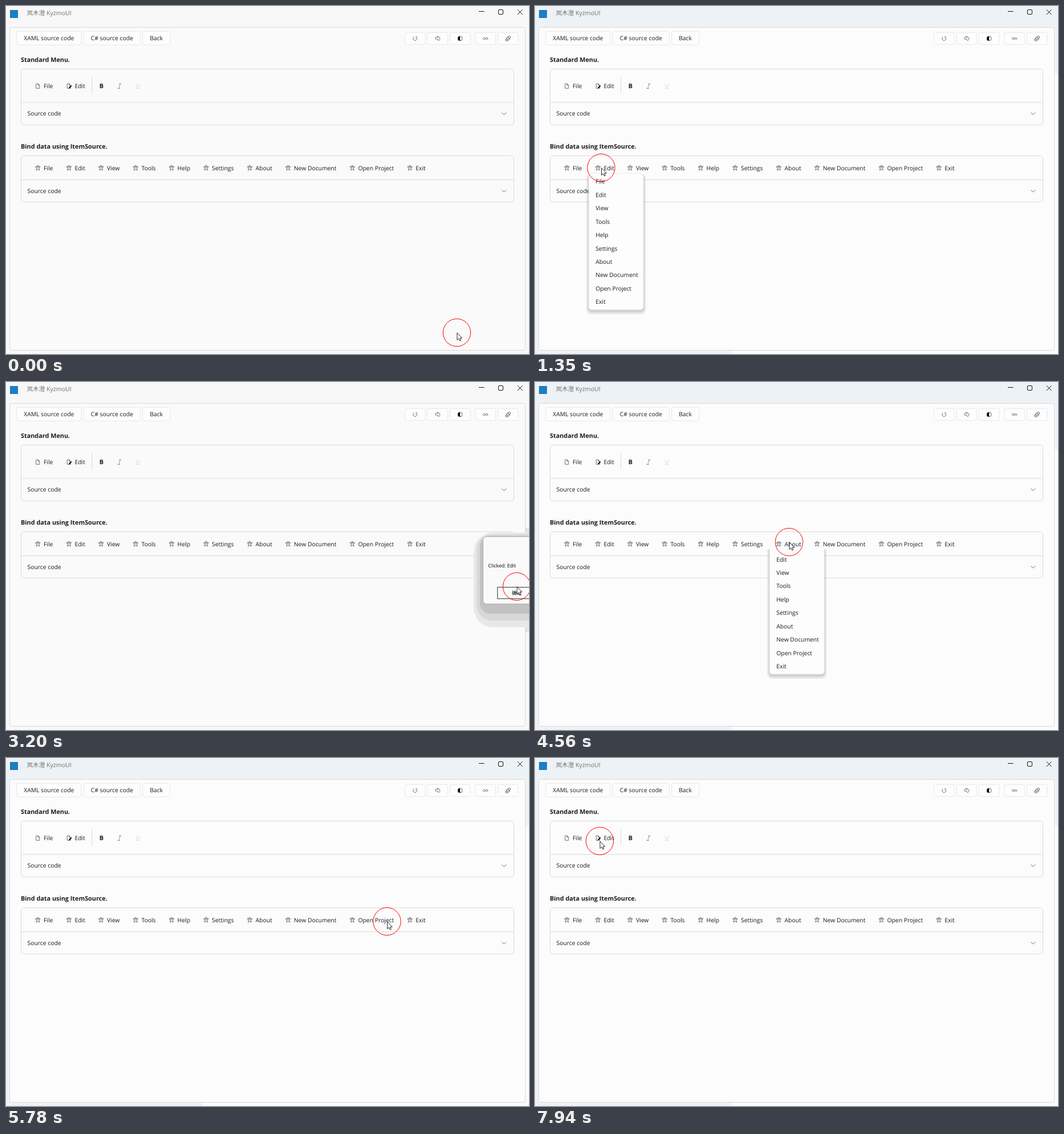
Write an HTML page that moves like this. It is 917x610 px and loops after 7990 ms.

```html
<!DOCTYPE html>
<html lang="en">
<head>
<meta charset="utf-8">
<style>
  html, body { margin: 0; width: 100%; height: 100%; overflow: hidden; background: #f8f8f8; }
  svg { display: block; width: 917px; height: 610px; }
  text { font: 10.35px "Open Sans", "Noto Sans CJK SC", "Noto Sans CJK", sans-serif; fill: #1c1c1c; text-rendering: geometricPrecision; }
  .head { font-size: 10.85px; font-weight: 700; }
  .title { font-size: 10.6px; fill: #707070; }
  .small { font-size: 8.7px; fill: #000; }
  .icon { fill: none; stroke: #484848; stroke-width: .8; }
  .edge { fill: none; stroke: #dadada; }
  .button { fill: #fdfdfd; stroke: #e8e8e8; }
</style>
</head>
<body>
<svg id="stage" viewBox="0 0 917 610"></svg>
<script>
const LOOP = 7990;
const SLIDE_TIME = 550, SLIDE = 90;
const MOVE_TIME = 400;

const LABELS = ["File", "Edit", "View", "Tools", "Help", "Settings", "About", "New Document", "Open Project", "Exit"];

// open time, close time, label
const MENUS = [[910, 2060, "Edit"], [4349, 4930, "About"], [5190, 5760, "New Document"], [6840, 7400, "Open Project"]];
const DIALOGS = [[2300, 3420], [7400, 7660]];

// arrival time, x, y of the pointer
const STOPS = [
  [50, 790.5, 572.5], [260, 270.5, 281], [880, 116, 283.5], [2060, 122, 331], [2520, 147, 152],
  [3190, 895.5, 358.5], [4000, 375, 273.5], [4550, 445.5, 280.5], [5110, 547.5, 289.5], [5780, 668, 286.5],
  [5950, 709.5, 290], [6290, 626.5, 392], [6790, 626.5, 392], [6900, 618, 285], [7560, 893, 390], [7930, 113.5, 145.5]
];

const text = (x, y, s, cls = "") => `<text x="${x}" y="${y}" class="${cls}">${s}</text>`;
const box = (x, y, w, h, r, attrs) => `<rect x="${x}" y="${y}" width="${w}" height="${h}" rx="${r}" ${attrs}/>`;
const icon = (x, y, d, attrs = "") => `<path class="icon" transform="translate(${x} ${y})" d="${d}" ${attrs}/>`;
const ring = (x, y, r) => `<circle class="icon" cx="${x}" cy="${y}" r="${r}"/>`;

const pen = document.createElement("canvas").getContext("2d");
pen.font = '10.35px "Open Sans", sans-serif';
const widthOf = s => pen.measureText(s).width;

// Sets labels side by side; returns the left edge of each.
function flow(labels, x, gap) {
  return labels.map(s => {
    const left = x;
    x += widthOf(s) + gap;
    return left;
  });
}

const labelX = flow(LABELS, 66, 38.1);
const PAGE = "M-3-4H.6L3-1.5V4H-3ZM.6-4V-1.5H3";

const person = (x, y) => ring(x, y - 3.2, 1.3) +
  icon(x, y, "M-4-2.5Q0-.5 4-2.5Q5-1.4 1.8-.3L3 4Q2 5 0 1.6Q-2 5-3 4L-1.8-.3Q-5-1.4-4-2.5");

function titleBar() {
  return box(7, 7, 14, 14, 0, 'fill="#1b7fc4"') +
    text(36.5, 16.3, "岚木澄 KyzmoUI", "title") +
    '<g fill="none" stroke="#111"><path d="M829 9.5H838.5M897 6.5L905.5 15M905.5 6.5L897 15"/>' +
    box(863.5, 6.5, 8, 8, 1.5, "") + "</g>";
}

function toolbar() {
  const labels = ["XAML source code", "C# source code", "Back"];
  const glyphs = [
    "M2.2-2.6A3.4 3.4 0 1 1-1.8-2.9M2.4-4V-2.4H.8",
    "M-4-.5C-3-5 4-4.5 4 .5C4 4 0 4 .5 2.2C.5 0-1.8 1.6-3.4.9ZM-1-2H1.5",
    "M0-4A4 4 0 0 1 0 4A4 4 0 0 1 0-4",
    "M0 0C-1.6-2.4-4-2.2-4 0S-1.6 2.4 0 0S4-2.2 4 0S1.6 2.4 0 0",
    "M.5-4H4V-.5H.5ZM-4 1H-1V4H-4ZM-2.5 1V-2H.5M2.2-.5V2.5H-1"
  ];
  const left = flow(labels, 31.2, 29.3).map((x, i) =>
    box(x - 12.5, 44.5, widthOf(labels[i]) + 25, 23.5, 3, 'class="button"') + text(x, 59.8, labels[i]));
  const right = glyphs.map((d, i) => {
    const x = 699.5 + i * 39.5 + (i > 2 ? 5 : 0);
    return box(x, 46.5, 35.5, 21, 3, 'class="button"') + icon(x + 17.7, 57, d);
  });
  return left.join("") + right.join("") + '<path d="M796.2 53a4 4 0 0 0 0 8Z" fill="#111"/>';
}

function card(title, y, split, h) {
  return text(26, y - 12.7, title, "head") + box(26.5, y, 864, h, 5, 'class="edge"') +
    `<path class="edge" d="M26.5 ${split}H890.5"/>` +
    text(37.5, split + 23.3, "Source code") +
    icon(873.3, split + 19.7, "M-4-2L0 2L4-2");
}

function standardMenu() {
  return [0, 1].map(i => icon(labelX[i] - 10.2, 140.3, PAGE) + text(labelX[i], 144.3, LABELS[i])).join("") +
    '<path d="M110 144.5L110.6 142.3L114 138.8L115.4 140.2L112 143.8Z" fill="#111"/>' +
    '<path class="edge" d="M150.5 125V154"/>' +
    text(163.8, 144.2, "B", "head") +
    icon(199, 140.5, "M-1-4H3.5M-3.5 4H1M1.4-4L-1.4 4", 'style="stroke:#777"') +
    icon(231, 140.3, "M-2.5-4V0Q-2.3 2.2 0 2.2T2.5 0V-4M-3.2 4.2H3.2", 'style="stroke:#ccc"');
}

const boundMenu = () => LABELS.map((s, i) => person(labelX[i] - 10.2, 283.8) + text(labelX[i], 287.5, s)).join("");

function menu() {
  return box(-4, 0, 104, 247, 9, 'opacity=".085"') +
    box(-1.5, 2, 99, 241.5, 7, 'opacity=".09"') +
    box(0, 0, 96, 239, 5, 'fill="#fdfdfd" stroke="#e2e2e2" stroke-width=".7"') +
    LABELS.map((s, i) => text(12, 18 + i * 23.45, s)).join("");
}

function dialog() {
  const shadow = ["#e8e8e8", "#d8d8d8", "#c2c2c2"].map((c, i) =>
    box(820 + i * 5.5, 264 + i * 3, 140, 166 - i * 15, 34 - i * 8, `fill="${c}"`));
  return box(911, 256, 6, 183, 0, 'fill="#e4e4e4"') + shadow.join("") +
    box(836.5, 271, 120, 118, 6, 'fill="#fafafa" stroke="#a4a4a4" stroke-width=".9"') +
    text(845.5, 325, "Clicked: Edit", "small") +
    box(861.7, 359.7, 80, 20, 0, 'fill="#fafafa" stroke="#666" stroke-width="1.4"') +
    text(887, 373.2, "确定", "small");
}

document.getElementById("stage").innerHTML =
  `<defs><clipPath id="below">${box(0, 293, 917, 317, 0, "")}</clipPath></defs>` +
  box(0, 0, 917, 610, 0, 'id="back"') +
  '<path id="pale" d="M911 118H917V610H344V604H911Z" fill="#f9fbfc"/>' +
  box(6.5, 37.5, 904, 566, 4, 'id="panel" stroke="#d9d9d9"') +
  titleBar() + toolbar() +
  card("Standard Menu.", 110.5, 169, 98) + standardMenu() +
  card("Bind data using ItemSource.", 262.5, 304.5, 81) + boundMenu() +
  `<g clip-path="url(#below)"><g id="menu">${menu()}</g></g>` +
  `<g id="dialog">${dialog()}</g>` +
  '<g id="pointer"><circle r="24.2" fill="none" stroke="#f00"/>' +
  '<path d="M.5 .3V13L3.4 10.4L5.3 14.5L7.3 13.6L5.5 9.6H9.2Z" fill="#fff" stroke="#111" stroke-width=".9"/></g>';

const [back, pale, panel, menuBox, dialogBox, pointer] =
  ["back", "pale", "panel", "menu", "dialog", "pointer"].map(id => document.getElementById(id));
const show = (el, on) => el.setAttribute("visibility", on ? "visible" : "hidden");
const place = (el, x, y) => el.setAttribute("transform", `translate(${x} ${y})`);
const during = t => ([from, to]) => t >= from && t < to;
const clamp = v => Math.min(1, Math.max(0, v));

// Rests at each stop, then glides so as to arrive at the next one on time.
function pointerAt(t) {
  const next = STOPS.findIndex(s => s[0] > t);
  const [t1, x1, y1] = STOPS.at(next);
  const [t0, x0, y0] = STOPS.at(next > 0 ? next - 1 : next);
  const from = Math.max(t0, t1 - MOVE_TIME);
  const p = t1 > from ? clamp((t - from) / (t1 - from)) : 1;
  const e = p * p * (3 - 2 * p);
  return [x0 + (x1 - x0) * e, y0 + (y1 - y0) * e];
}

function draw(t) {
  const asking = DIALOGS.some(during(t));
  const active = t >= MENUS[0][0] && !asking;
  back.setAttribute("fill", active ? "#edf2f7" : "#f8f8f8");
  panel.setAttribute("fill", active ? "#fcfcfc" : "#fafafa");
  show(pale, active);
  show(dialogBox, asking);

  const open = MENUS.find(during(t));
  show(menuBox, open);
  if (open) {
    const left = 1 - clamp((t - open[0]) / SLIDE_TIME);
    place(menuBox, labelX[LABELS.indexOf(open[2])] - 26.3, 294 - SLIDE * left ** 3);
  }
  place(pointer, ...pointerAt(t));
}

const start = performance.now();
function tick() {
  draw((performance.now() - start) % LOOP);
  requestAnimationFrame(tick);
}
tick();
</script>
</body>
</html>
```
